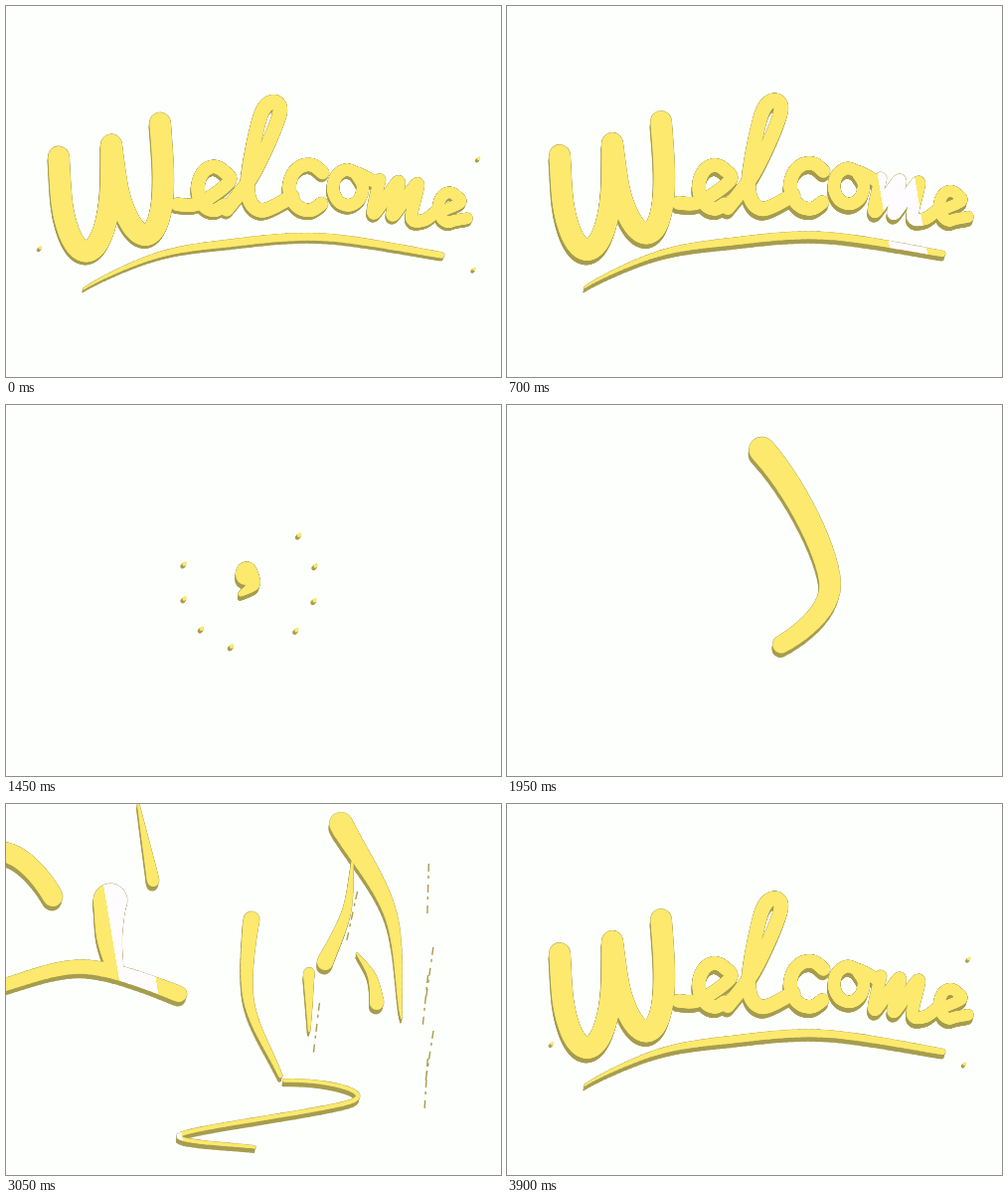
Animation, 498 px wide and 373 px high, one loop 3.95 s. Source, as an HTML page with a canvas:

```html
<!DOCTYPE html>
<html lang="en">
<head>
<meta charset="utf-8">
<title>Welcome</title>
<style>
html, body { margin: 0; width: 100%; height: 100%; overflow: hidden; background: #fdfffc; }
canvas { display: block; }
</style>
</head>
<body>
<canvas id="stage" width="498" height="373"></canvas>
<script>
const ctx = document.getElementById('stage').getContext('2d');
const LOOP = 3950, STEP = 50, SAMPLES = 16;
const YELLOW = '#fce96d', OLIVE = '#a79d4e', EDGE = '#aaa25a', WHITE = '#fefcff', PAPER = '#fdfffc';

const clamp = (v, lo = 0, hi = 1) => Math.min(hi, Math.max(lo, v));
const mix = (a, b, k) => a + (b - a) * k;
const progress = (t, from, to) => clamp((t - from) / (to - from));
const repeat = (n, make) => Array.from({ length: n }, (_, i) => make(i));
const random = seed => Math.abs(Math.sin(seed * 12.9898) * 43758.5453) % 1;

// Catmull-Rom point at a fractional index
function along(points, u) {
  const last = points.length - 1, i = Math.min(Math.floor(u), last - 1), f = u - i;
  const [p, q, r, s] = [-1, 0, 1, 2].map(d => points[clamp(i + d, 0, last)]);
  return [0, 1].map(k => q[k] + f / 2 * (r[k] - p[k] + f * (2 * p[k] - 5 * q[k] + 4 * r[k] - s[k]
    + f * (3 * (q[k] - r[k]) + s[k] - p[k]))));
}

// Visible part of a curve as short segments with a changing radius
function ribbon(points, tail, head, tailR, headR, bulge = 0, warp = p => p) {
  const last = points.length - 1, from = clamp(tail, 0, last), to = clamp(head, 0, last);
  if (to <= from) return [];
  const count = Math.ceil((to - from) * SAMPLES);
  return repeat(count + 1, i => {
    const u = mix(from, to, i / count), q = (u - tail) / (head - tail);
    const [x, y] = warp(along(points, u));
    return { x, y, r: mix(tailR, headR, q) + bulge * Math.sin(Math.PI * q) };
  });
}

// Building blocks of the handwriting
const arc = (cx, cy, rx, ry, from, to) => repeat(9, i => {
  const a = mix(from, to, i / 8);
  return [cx + rx * Math.cos(a), cy + ry * Math.sin(a)];
});
const bowl = (x0, y0, x1, y1, depth, lean) => repeat(9, i => {
  const a = Math.PI * i / 8, across = (1 - Math.cos(a)) / 2, sag = Math.abs(Math.sin(a));
  return [mix(x0, x1, across) + lean * sag, mix(y0, y1, across) + depth * sag ** .8];
});
const humps = (x, y, count) => repeat(count * 2, i => [x + 19 * (i >> 1) - 6 * (i % 2), y + 2 * (i >> 1) + 34 * (i % 2)]);

const letters = [
  { r: 10.5, points: bowl(53, 150, 106, 138, 101, 3) },
  { r: 10.5, points: bowl(106, 138, 155, 116, 101, 13) },
  { r: 6.5, points: [[172, 198], [194, 197], ...arc(209, 182, 16, 22, -.3, -5.4)] },
  { r: 7, points: [[222, 203], [250, 165], [275, 108], [268, 95], [255, 112], [243, 180], [256, 204], [288, 190]] },
  { r: 6.5, points: arc(304, 181, 19, 23, -.7, -5.5) },
  { r: 6, points: [...arc(344, 181, 15, 18, -.9, -7.2), [372, 176]] },
  { r: 6, points: [...humps(376, 173, 3), [420, 214], [432, 206]] },
  { r: 5.5, points: [[432, 207], ...arc(446, 201, 11, 15, -.3, -5.2), [464, 212]] },
];
const wordPoints = letters.flatMap(l => l.points);
const nearest = ([x, y]) => wordPoints.reduce((best, p) =>
  Math.hypot(p[0] - x, p[1] - y) < Math.hypot(best[0] - x, best[1] - y) ? p : best);

const underline = [[250, 345], [176, 332], [350, 298], [280, 278], [75, 302], [78, 283], [150, 250],
  [225, 237], [320, 231], [438, 249]];
const ballPath = [[236, 190], [249, 180], [241, 171], [250, 250], [325, 180], [240, 30], [100, 15],
  [88, 51], [93, 86], [96, 140], [-40, 300]];

// A bent stroke caught in flight at time "at"; it ends at the closest part of the word
function flyer(at, tail, head, bend, tailR, headR) {
  const dx = head[0] - tail[0], dy = head[1] - tail[1];
  const mid = [tail[0] + dx / 2 - dy * bend, tail[1] + dy / 2 + dx * bend];
  const entry = [2 * tail[0] - mid[0], 2 * tail[1] - mid[1]];
  return { at, tailR, headR, points: [entry, tail, mid, head, nearest(head)] };
}
const flyers = [
  flyer(2500, [92, 372], [2, 259], -.05, 10, 15),
  flyer(3050, [-60, 75], [47, 93], -.33, 10, 10),
  flyer(3050, [133, 0], [148, 77], 0, 1, 6),
  flyer(3050, [-20, 187], [174, 191], -.13, 6, 8),
  flyer(3050, [110, 168], [105, 97], -.05, 8, 17),
  flyer(3050, [276, 273], [247, 116], -.11, 2, 8),
  flyer(3050, [349, 55], [321, 159], -.07, .7, 8),
  flyer(3050, [305, 228], [305, 170], 0, 1, 5.5),
  flyer(3050, [337, 20], [398, 215], -.1, 12, 1),
  flyer(3050, [353, 150], [373, 200], -.1, .7, 7),
];

function strokeRibbon(list, dx, dy, extra) {
  for (let i = 1; i < list.length; i++) {
    const a = list[i - 1], b = list[i];
    ctx.lineWidth = 2 * b.r + extra;
    ctx.beginPath();
    ctx.moveTo(a.x + dx, a.y + dy);
    ctx.lineTo(b.x + dx, b.y + dy);
    ctx.stroke();
  }
}

function paint(ribbons, depth, face, dy) {
  const layer = (color, x, y, extra) => {
    ctx.strokeStyle = color;
    ribbons.forEach(r => strokeRibbon(r, x, y + dy, extra));
  };
  layer(OLIVE, -1, depth, 0);
  layer(OLIVE, -.5, depth / 2, 0);
  layer(EDGE, 0, 0, .8);
  layer(face, 0, 0, 0);
}

function gleamX(t) {
  if (t < 1000) return 393 + .6 * (t - 700);
  if (t < 2300) return -100;
  if (t < 3050) return mix(-19, 133, (t - 2500) / 550);
  return 133 + .92 * (t - 3050);
}

function gleamFill(t) {
  const x = gleamX(t), fill = ctx.createLinearGradient(x - 18, 183, x + 18, 177);
  [YELLOW, WHITE, WHITE, YELLOW].forEach((color, i) => fill.addColorStop(i < 2 ? 0 : 1, color));
  return fill;
}

function dash(x, y, angle, length) {
  ctx.strokeStyle = OLIVE;
  ctx.lineWidth = 1.4;
  ctx.beginPath();
  ctx.moveTo(x, y);
  ctx.lineTo(x + Math.cos(angle) * length, y + Math.sin(angle) * length);
  ctx.stroke();
}

function crumb(x, y, size) {
  [[OLIVE, -1, 2, size], [YELLOW, .5, 0, size * .8]].forEach(([color, dx, dy, r]) => {
    ctx.fillStyle = color;
    ctx.beginPath();
    ctx.ellipse(x + dx, y + dy, r, r * .75, -.8, 0, 7);
    ctx.fill();
  });
}

// Loose specks hovering just above and below the letters
function drawTicks(drift, length) {
  for (let i = 0; i < 24; i++) {
    const [x, y] = wordPoints[Math.floor(random(i + 1) * wordPoints.length)];
    const side = i % 2 ? 1 : -1;
    dash(x + side * 8, y + side * (14 + 10 * random(i + 50) + drift), random(i + 90) * 3, length);
  }
}

function drawSlivers(drift) {
  ctx.lineCap = 'butt';
  ctx.setLineDash([8, 4, 3, 6]);
  for (let i = 0; i < 8; i++)
    dash(430 - 170 * random(i + 7) ** 2, 60 + 28 * i + drift, 1.6 + .2 * random(i), 50);
  ctx.setLineDash([]);
}

// Pulls the word into a swirl around the ball
function collapse(k) {
  const s = 1 - k * k, stretch = 1 + .2 * Math.sin(Math.PI * k), turn = k ** 3 * 1.5;
  const c = Math.cos(turn) * s, n = Math.sin(turn) * s;
  return ([x, y]) => {
    const dx = x - 241, dy = (y - 172) * stretch;
    return [241 + dx * c - dy * n, 172 + dx * n + dy * c];
  };
}

function wordRibbons(t) {
  const leaving = t < 2000, k = leaving ? progress(t, 1050, 1400) : 0;
  const warp = collapse(k), scale = mix(1, .4, k * k), cut = k * .6;
  const write = leaving ? 1 : progress(t, 3100, 3350);
  const head = leaving ? 9 : Math.min(9, 3 + (t - 3050) * 4 / 350);
  const size = leaving ? scale : mix(.55, 1, progress(t, 3050, 3400));
  return [
    ...letters.map(({ r, points }) => {
      const n = points.length - 1;
      return ribbon(points, cut * n, write * n, r * scale, r * scale, 0, warp);
    }),
    ribbon(underline, head - 4 + cut * 4, head, .7 * size, 3 * size, 1.8 * size, warp),
  ];
}

function ballRibbon(t) {
  const k = (t - 1450) / 1050, head = 2 + 6 * k, q = clamp(k);
  const grow = progress(t, 1300, 1400);
  return ribbon(ballPath, head - mix(2, 1, q), head, mix(2, 16, q) * grow, mix(10, 16, q) * grow);
}

function draw(t) {
  ctx.fillStyle = PAPER;
  ctx.fillRect(0, 0, 498, 373);
  ctx.lineCap = 'round';
  if (t >= 1100 && t <= 1300) drawTicks(0, 4);
  if (t >= 3300 && t <= 3600) drawTicks((t - 3400) * .06, mix(5, 1, progress(t, 3400, 3650)));
  if (t >= 2900 && t <= 3200) drawSlivers((t - 3050) * .2);
  ctx.lineCap = 'round';

  const ribbons = [];
  if (t < 1400 || t >= 2800) ribbons.push(...wordRibbons(t));
  if (t >= 1350 && t < 2850) ribbons.push(ballRibbon(t));
  flyers.forEach(f => {
    const shift = (t - f.at) / 75;
    ribbons.push(ribbon(f.points, 1 + shift, 3 + shift, f.tailR, f.headR));
  });
  const press = 1 - progress(t, 0, 150);
  paint(ribbons, 4.5 - 1.5 * press, gleamFill(t), 1.5 * press);

  if (t >= 1350 && t <= 1600) {
    const radius = 68 + (t - 1450) * .4;
    arc(245, 177, radius, radius, -.75, 3.4).filter((_, i) => i !== 4)
      .forEach(([x, y]) => crumb(x, y, 3.2));
  }
  const flight = t < 300 ? t + LOOP : t;
  if (flight >= 3650) [-.21, .29, 2.95].forEach(a => {
    const radius = 214 + (flight - 3900) * .22;
    crumb(255 + radius * Math.cos(a), 200 + radius * Math.sin(a), 2.6);
  });
}

function tick(now) {
  draw(Math.floor(now % LOOP / STEP) * STEP);
  requestAnimationFrame(tick);
}
draw(0);
requestAnimationFrame(tick);
</script>
</body>
</html>
```
